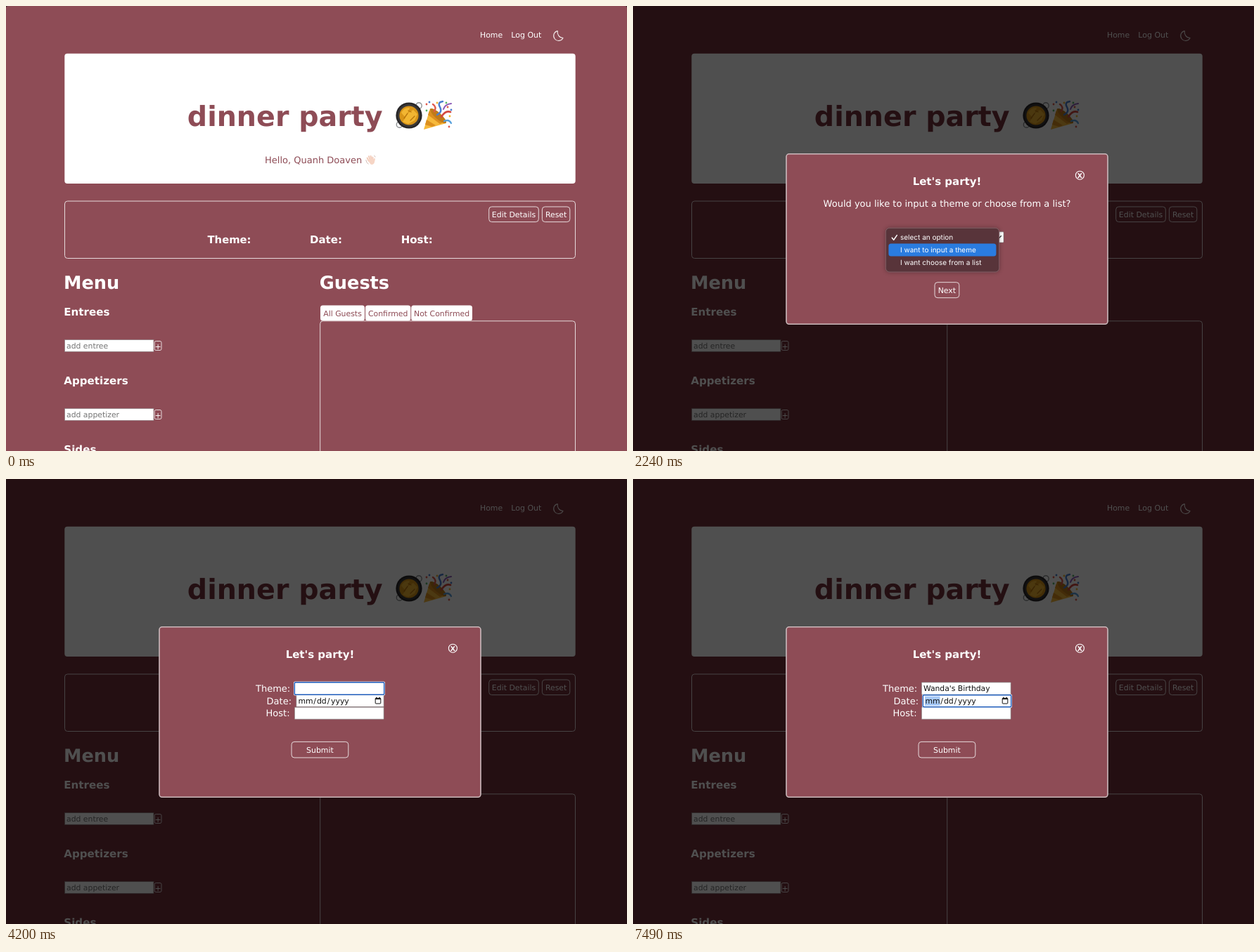
An HTML page that plays this animation: 883 px wide and 634 px high, repeating every 8 s.

```html
<!DOCTYPE html>
<html lang="en">
<head>
<meta charset="utf-8">
<title>Dinner party</title>
<style>
  html, body { margin: 0; width: 100%; height: 100%; overflow: hidden; background: #8e4c56; }
  svg { display: block; width: 883px; height: 634px; --wine: #8e4c56; }
  svg.dim { --wine: #74303a; }
  text { font-family: "DejaVu Sans", Verdana, sans-serif; text-rendering: geometricPrecision; white-space: pre; }
  .b { font-weight: 700; }
  .m { text-anchor: middle; }
  .menu text { font-family: Inter, sans-serif; }
</style>
</head>
<body>
<svg id="stage" viewBox="0 0 883 634" xmlns="http://www.w3.org/2000/svg"></svg>
<script>
const LOOP = 8000, FRAME = 70;
const WINE = 'var(--wine)', LINE = '#e6d9db';
const stage = document.getElementById('stage');

const text = (x, y, str, size, fill = '#fff', cls = '') =>
  `<text x="${x}" y="${y}" font-size="${size}" fill="${fill}" class="${cls}">${str}</text>`;
const box = (x, y, x2, y2, r, fill, stroke = 'none', extra = '') =>
  `<rect x="${x}" y="${y}" width="${x2 - x}" height="${y2 - y}" rx="${r}" fill="${fill}" stroke="${stroke}" ${extra}/>`;
const line = (d, stroke, w, fill = 'none') =>
  `<path d="${d}" stroke="${stroke}" stroke-width="${w}" fill="${fill}" stroke-linecap="round" stroke-linejoin="round"/>`;
const shape = (d, fill) => `<path d="${d}" fill="${fill}"/>`;
const dot = (x, y, r, fill, stroke = 'none', w = 1) =>
  `<circle cx="${x}" cy="${y}" r="${r}" fill="${fill}" stroke="${stroke}" stroke-width="${w}"/>`;
const group = (id, body, cls = '') => `<g id="${id}" class="${cls}">${body}</g>`;

const button = (x, y, x2, y2, label) =>
  box(x, y, x2, y2, 4, 'none', LINE) + text((x + x2) / 2, y + 15.2, label, 10.9, '#fff', 'm');
const tab = (x, x2, label) =>
  box(x, 426.5, x2, 448.5, 3.5, '#fff') + text((x + x2) / 2, 441.5, label, 10.9, WINE, 'm');
const course = (y, title, hint) =>
  text(82.3, y, title, 15.1, '#fff', 'b') +
  box(83.5, y + 34.5, 210, y + 51.5, 0, '#fff', '#8b7a7c', 'stroke-width=".7"') +
  text(86, y + 47, hint, 10.85, '#757575') +
  box(211.2, y + 36.5, 221, y + 49.5, 2, 'none', LINE) +
  text(216.1, y + 47.6, '+', 11, '#fff', 'm');

const pan =
  dot(559.5, 169, 4.2, 'none', '#8d9092', 1.4) + dot(587, 142, 4.2, 'none', '#8d9092', 1.4) +
  dot(573, 156, 18.6, '#262527') + dot(573, 156, 16.2, '#3b3836') + dot(573, 156, 13.6, '#d99518') +
  shape('M562 152q4-8 12-7l-3 8 8-5 6 6-4 9-9 5-8-3 4-6z', '#f2b632') +
  line('M566 160l5-7M575 163l6-6M572 149l4 2', '#b9750c', 1.3);

const popper =
  shape('M594 176L603 146Q617 151 626 167Z', '#f6b93b') +
  shape('M596 169l2-7 13 8-5 2zM600 155l2-6 19 17-4 2z', '#dc8f1e') +
  '<ellipse cx="614.5" cy="156.5" rx="4.4" ry="15" transform="rotate(-48 614.5 156.5)" fill="#c07a1a"/>' +
  line('M613 155q8-4 4-11t4-8', '#4a7fd0', 2.4) +
  line('M619 158q6-10 13-7', '#d4483f', 2.6) +
  line('M609 150q4-6-2-10', '#e05a4c', 2.4) +
  line('M622 147q2-7 11-8', '#8d5bb8', 2) +
  line('M623 164q7-3 10 3', '#57a0dc', 2.2) +
  [[598, 140, '#e05a4c'], [602, 137, '#4a7fd0'], [613, 138, '#f2b632'], [628, 144, '#e05a4c'], [631, 157, '#f2b632'],
   [630, 172, '#e05a4c'], [626, 138, '#58b368'], [598, 149, '#58b368'], [633, 148, '#4a7fd0']]
    .map(([x, y, c]) => dot(x, y, 1.4, c)).join('');

const wave =
  line('M515.5 220.5l-1.8-4M517.5 218.5l-1.6-4.4M519.6 218l-1-4.2M521.6 219l-.2-3.6', '#f3cdbb', 2) +
  shape('M514 219.5l7-2.5 2 1 .8-1.6q1.6.3 1 2.6l-1.3 5q-2 2.6-5 1.6z', '#f6d5c5') +
  line('M511.8 219.5q.3 4 3.4 5.6M523.6 213q1.2.6 1.3 2', '#c9a9a0', .8);

const page =
  box(0, 0, 883, 634, 0, WINE) +
  text(674, 45, 'Home', 10.9) + text(718.3, 45, 'Log Out', 11) +
  line('M784.3 35.6A7 7 0 1 0 792 45.5A8.2 8.2 0 0 1 784.3 35.6Z', '#f3ecec', 1.1) +
  box(83.3, 67.8, 809.7, 253, 4, '#fff') +
  text(257.8, 171, 'dinner party', 39.6, WINE, 'b') + pan + popper +
  text(368, 223.5, 'Hello, Quanh Doaven', 13, WINE) + wave +
  box(83.5, 278, 809.5, 359.5, 4, 'none', LINE) +
  button(686.7, 286, 757.3, 307.6, 'Edit Details') + button(762.4, 286, 801.8, 307.6, 'Reset') +
  text(286.5, 337.5, 'Theme:', 14.8, '#fff', 'b') +
  text(432, 337.5, 'Date:', 15, '#fff', 'b') +
  text(561.7, 337.5, 'Host:', 15, '#fff', 'b') +
  text(82, 403, 'Menu', 25.6, '#fff', 'b') + text(445.8, 403, 'Guests', 25.6, '#fff', 'b') +
  course(441, 'Entrees', 'add entree') + course(539, 'Appetizers', 'add appetizer') +
  text(82.3, 637, 'Sides', 15.1, '#fff', 'b') +
  tab(447, 510, 'All Guests') + tab(511, 575.3, 'Confirmed') + tab(576.2, 663, 'Not Confirmed') +
  box(446.7, 448.8, 809.5, 700, 4, 'none', LINE);

const choice =
  text(446.5, 286, 'Would you like to input a theme or choose from a list?', 13, '#fff', 'm') +
  box(366, 321.8, 527, 337, 1, '#fff', '#767676', 'stroke-width=".6"') +
  `<text id="picked" x="369.6" y="333.6" font-size="10.7" fill="#111"></text>` +
  line('M516.4 327.6l3.5 3.6 3.5-3.6', '#222', 1.3) +
  button(429, 393.7, 463.8, 415.7, 'Next');

const menu =
  box(359.3, 316.3, 520.7, 379, 5.5, '#000', 'none', 'opacity=".35" filter="url(#blur)"') +
  box(359.3, 316.3, 520.7, 379, 5.5, '#58343a', '#86666b', 'stroke-width=".9"') +
  `<rect id="bar" x="363.4" width="153" height="18.2" rx="3.6" fill="#2a7ce0"/>` +
  line('M368.3 330.2l2.4 3 4.6-6.6', '#fff', 1.5) +
  text(380, 333.2, 'select an option', 10) +
  text(380, 351.2, 'I want to input a theme', 10) +
  text(380, 369.2, 'I want choose from a list', 10);

const field = (x, y, y2) => box(x, y, 537.2, y2, .5, '#fff', '#767676', 'stroke-width=".6"');
const ring = (id, x, y, y2) => group(id,
  box(x - 2, y - 1.8, 539, y2 + 1.8, 2, '#fff') +
  box(x - .7, y - .5, 537.7, y2 + .5, 1.2, '#fff', '#1f5dbb', 'stroke-width="1.5"'));
const form =
  text(355, 302.8, 'Theme:', 13) + text(370.6, 320.6, 'Date:', 13) + text(369.6, 338.3, 'Host:', 13) +
  field(410.4, 289.8, 307) + field(412.8, 307.6, 324.6) + field(410.4, 325.2, 342.2) +
  ring('themeRing', 411, 290.3, 306.7) + ring('dateRing', 413, 308.2, 324.2) +
  `<text id="typed" x="412.9" y="302.3" font-size="10.8" fill="#111"></text>` +
  `<rect id="caret" y="292" width="1" height="12.6" fill="#111"/>` +
  `<rect id="mark" x="415" y="309.6" width="21.6" height="13.4" fill="#a8caf8"/>` +
  [[415.4, 'mm'], [437.3, '/'], [441.9, 'dd'], [456.8, '/'], [462, 'yyyy']]
    .map(([x, s]) => text(x, 320.2, s, 10.9, '#111')).join('') +
  box(525.2, 312.3, 532.8, 320, .8, 'none', '#111', 'stroke-width="1"') +
  line('M525.6 313.2h6.8M526.8 311.3v1M531.2 311.3v1', '#111', 1.4) +
  button(406, 374.4, 486.8, 397, 'Submit');

const modal =
  box(218, 210.8, 675, 453.3, 4, '#8e4c56', '#cbbabc', 'stroke-width="1.6"') +
  text(446.5, 255, "Let's party!", 15, '#fff', 'b m') +
  dot(635.4, 241.2, 6, 'none', '#fff', 1.1) + text(635.4, 244.6, 'X', 9.3, '#fff', 'b m') +
  group('choice', choice) + group('menu', menu, 'menu') + group('form', form);

stage.innerHTML =
  '<defs><filter id="blur" x="-20%" y="-40%" width="140%" height="180%"><feGaussianBlur stdDeviation="3"/></filter></defs>' +
  page + group('dialog', box(0, 0, 883, 634, 0, '#000', 'none', 'opacity=".69"') + modal) +
  shape('M0 0h3Q0 0 0 3zM883 0h-3Q883 0 883 3z', '#2b2224');

const $ = id => document.getElementById(id);
const show = (id, on) => $(id).setAttribute('display', on ? 'inline' : 'none');

const THEME = "Wanda's Birthday";
const KEYS = [4410, 4550, 4760, 4900, 4970, 5110, 5180, 5320, 5530, 5880, 6020, 6090, 6230, 6300, 6440, 6510];
const OPEN = 980, DROP = 1890, FADE = 2660, PICK = 2870, FORM = 3150, FOCUS = 3640, DATE = 7490;

function draw(now) {
  const t = Math.floor((now % LOOP) / FRAME) * FRAME;
  const within = (a, b) => t >= a && t < b;

  stage.classList.toggle('dim', t >= OPEN);
  show('dialog', t >= OPEN);
  show('choice', t < FORM);
  show('form', t >= FORM);
  $('picked').textContent = t < PICK ? 'select an option' : 'I want to input a theme';

  // the chosen row blinks once, then the list fades
  show('menu', within(DROP, PICK));
  $('menu').setAttribute('opacity', t < FADE ? 1 : Math.max(0, 1 - (t - FADE) / 190));
  $('bar').setAttribute('y', t < 2240 ? 320.4 : 338.4);
  show('bar', !within(2520, 2590));

  const typing = within(FOCUS, DATE);
  const count = KEYS.filter(k => k <= t).length;
  const last = count ? KEYS[count - 1] : FOCUS;
  show('themeRing', typing);
  show('dateRing', t >= DATE);
  show('mark', t >= DATE);
  $('typed').textContent = THEME.slice(0, count);
  show('caret', typing && Math.floor((t - last) / 560) % 2 === 0);
  const width = t >= FORM && count ? $('typed').getComputedTextLength() : 0;
  $('caret').setAttribute('x', 412.9 + width);
}

const start = performance.now();
function tick() {
  draw(performance.now() - start);
  requestAnimationFrame(tick);
}
tick();
</script>
</body>
</html>
```
